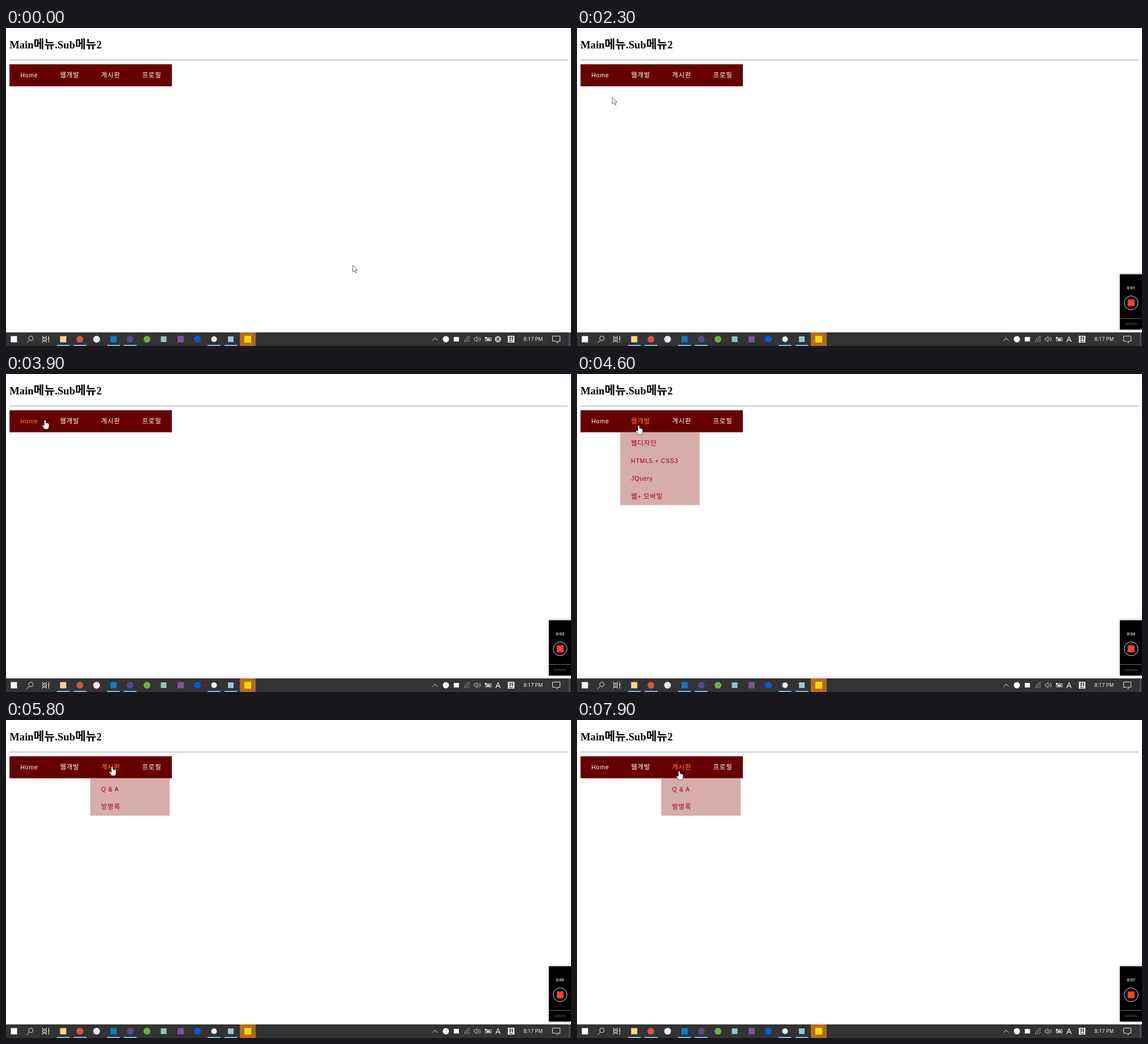
Write an HTML page that moves like this. It is 998 by 561 pixels and loops after 8 s.

```html
<!DOCTYPE html>
<html lang="ko">
<head>
<meta charset="utf-8">
<title>Main메뉴.Sub메뉴2</title>
<style>
html, body { margin: 0; width: 100%; height: 100%; overflow: hidden; background: #fff; }
svg { display: block; }
text { font-family: "Liberation Sans", "Noto Sans CJK KR", "Noto Sans CJK", sans-serif; white-space: pre; }
.title { font: bold 18.7px "Liberation Serif", "Noto Sans CJK KR", "Noto Sans CJK", serif; }
.menu { font-size: 10.5px; letter-spacing: .8px; fill: #fff; }
.sub { fill: #96001c; }
.hot { fill: #ff8c1a; }
.ko { font-size: 1.09em; }
.ui { font-family: "Open Sans", sans-serif; fill: #fff; }
.line { fill: none; stroke: #e4e4e4; }
</style>
</head>
<body>
<svg id="stage" width="998" height="561" viewBox="0 0 998 561"></svg>
<script>
const stage = document.getElementById('stage');
const rect = (x, y, w, h, fill, more = '') =>
  `<rect x="${x}" y="${y}" width="${w}" height="${h}" fill="${fill}" ${more}/>`;
const disc = (x, y, r, fill) => `<circle cx="${x}" cy="${y}" r="${r}" fill="${fill}"/>`;
const line = (d, more = '') => `<path class="line" d="${d}" ${more}/>`;
// Hangul runs are set slightly larger than the Latin around them
const text = (x, y, s, cls, more = '') => `<text x="${x}" y="${y}" class="${cls}" ${more}>` +
  s.replace(/&/g, '&amp;').replace(/[가-힣]+/g, '<tspan class="ko">$&</tspan>') + '</text>';

const menu = [
  { x: 6.2, name: 'Home', items: [] },
  { x: 76.3, name: '웹개발', items: ['웹디자인', 'HTML5 + CSS3', 'JQuery', '웹+ 모바일'] },
  { x: 148.8, name: '게시판', items: ['Q & A', '방명록'] },
  { x: 221.3, name: '프로필', items: [] }
];
const menuLeft = 6.2, menuEnd = 293, menuTop = 64, menuBottom = 102.8;

function drawMenu() {
  return text(6.2, 36, 'Main메뉴.Sub메뉴2', 'title') +
    rect(menuLeft, 56, 985.6, 1, '#9c9c9c') +
    rect(menuLeft, menuTop, menuEnd - menuLeft, menuBottom - menuTop, '#660000') +
    menu.map(({ x, name, items }, i) => {
      const rows = items.map((s, n) => text(x + 19.2, 126 + n * 31.2, s, 'menu sub')).join('');
      return text(x + 19.2, 87, name, 'menu', `id="item${i}"`) +
        `<g id="drop${i}">` +
        (rows && rect(x, menuBottom, 140.4, 3.6 + items.length * 31.2, '#d6adab')) + rows + '</g>';
    }).join('');
}

function drawApps() {
  const square = (x, size, fill) => rect(x - size / 2, 549 - size / 2, size, size, fill);
  return square(14, 11, '#fff') +
    line('M41 551L36.5 555.5') + '<circle class="line" cx="44" cy="547.5" r="4"/>' +
    line('M64.5 543v2.5h7V543M64.5 555v-2.5h7v2.5M64.5 547.5h7v3h-7zM75.5 543v12M74 548h3') +
    square(101, 11, '#f6d77d') + disc(130.5, 549, 6, '#de5145') +
    disc(160, 549, 6, '#f3e6f5') + square(190, 11, '#0a7dcc') +
    disc(219.5, 549, 6, '#55498a') + disc(249, 549, 6, '#68b43e') +
    square(278.5, 10, '#8fc5bd') + square(308.5, 11, '#79569f') +
    disc(338, 549, 6, '#0759e5') + disc(367.5, 549, 5, '#f2f2f2') +
    square(397, 10, '#93c7d4') +
    rect(413, 537, 28, 24, '#b96c1c') + rect(435, 537, 6, 24, '#a9672b') +
    square(427, 12, '#fbd900') +
    [90, 119.5, 178.5, 208, 356, 386].map(x => rect(x, 559, 22.5, 2, '#76b9ed')).join('');
}

function drawTray() {
  return line('M753.5 551.5L758 547L762.5 551.5') +
    disc(777, 549, 5.5, '#fff') + rect(791, 545, 9, 8, '#fff') +
    line('M810 554A11 11 0 0 1 819.5 544M813 554A8 8 0 0 1 819.5 547.5M816 554A5 5 0 0 1 819.5 551', 'stroke-opacity=".7"') +
    line('M827 547h2l3-3v10l-3-3h-2zM834 546.5q2 2.5 0 5M836.5 545q3 4 0 8', 'stroke-opacity=".8"') +
    line('M847 546.5h10v5.5h-10z') + rect(849, 548, 6, 3, '#ddd') + rect(846, 545, 3, 3, '#ddd') +
    '<g id="offline">' + disc(869, 549, 5.5, '#c4c4c4') +
    '<path d="M866.5 546.5l5 5m0-5l-5 5" stroke="#333" stroke-width="1.3"/></g>' +
    text(869, 553.8, 'A', 'ui', 'id="latin" font-size="14.5" text-anchor="middle"') +
    rect(886.5, 543, 11.5, 12, '#fff') +
    text(892.2, 552.6, '한', '', 'font-size="9" font-weight="bold" fill="#222" text-anchor="middle"') +
    text(914, 552.3, '8:17 PM', 'ui', 'font-size="9.2"') +
    line('M965.5 543.5h13v9h-4.5v3l-3-3h-5.5z') + rect(994.5, 537, 1, 24, '#777');
}

function drawRecorder() {
  return '<g id="recorder">' +
    rect(959, 434.5, 39, 97.5, '#000', 'style="filter:drop-shadow(0 0 2px #0006)"') +
    text(978.5, 460.5, '0:00', 'ui', 'id="timer" font-size="7.4" font-weight="600" text-anchor="middle"') +
    '<circle class="line" cx="978.8" cy="484.8" r="12.2"/>' +
    rect(972.7, 478.7, 12.2, 12.2, '#f8402c', 'rx="2"') + rect(959, 512, 39, 1, '#6a6a6a') +
    text(978.5, 523.6, 'CANCEL', 'ui', 'font-size="6" style="fill:#777" text-anchor="middle"') + '</g>';
}

const pointers = '<g id="pointer" fill="#fff" stroke-linejoin="round">' +
  '<path id="arrow" stroke="#444" stroke-width=".8" d="M.5 .5V12.3L3.2 9.8L5.2 14L7.1 13.1L5.2 9.1H8.9Z"/>' +
  '<path id="hand" stroke="#222" stroke-width=".7" d="M-1.5 .8Q0 -1.4 1.4 .8V4.9Q2.8 3.9 3.8 5.3Q5 4.7 5.6 5.9Q7 5.8 7 7.3V10.8Q6.8 13.3 5 15.8H-1.2Q-2.5 12.8 -4.8 10.3Q-5.4 8.5 -3.6 8.3L-1.5 9.9Z"/></g>';

stage.innerHTML = drawMenu() + rect(0, 537, 998, 24, '#333') + drawApps() + drawTray() +
  drawRecorder() + pointers;

const $ = id => document.getElementById(id);
const show = (id, on) => $(id).setAttribute('visibility', on ? 'visible' : 'hidden');

// Pointer tip: time, x, y
const path = [
  [0, 612, 418], [500, 612, 418], [1700, 62, 122], [2500, 62, 122], [3200, 69, 81.5],
  [3900, 69, 81.5], [4500, 109, 91], [4900, 109, 91], [5600, 187.5, 82.5],
  [5900, 187.5, 82.5], [6600, 263.5, 93], [7100, 263.5, 93], [7800, 180.5, 90], [8000, 180.5, 90]
];
const loop = 8000, recordStart = 500;

function tipAt(t) {
  const i = path.findIndex(p => p[0] > t);
  const [t0, x0, y0] = path[i - 1], [t1, x1, y1] = path[i];
  const u = (t - t0) / (t1 - t0), k = u * u * (3 - 2 * u);
  return [x0 + (x1 - x0) * k, y0 + (y1 - y0) * k];
}

function render(now) {
  const t = Math.floor(now % loop / 100) * 100;
  const [x, y] = tipAt(t);
  const inside = y >= menuTop && y < menuBottom && x >= menuLeft && x < menuEnd;
  const hovered = inside ? menu.filter(m => m.x <= x).length - 1 : -1;
  menu.forEach((m, i) => {
    $('item' + i).classList.toggle('hot', i === hovered);
    show('drop' + i, i === hovered);
  });
  $('pointer').setAttribute('transform', `translate(${x} ${y})`);
  show('hand', inside);
  show('arrow', !inside);

  const recording = t >= recordStart;
  show('recorder', recording);
  show('latin', recording);
  show('offline', !recording);
  $('timer').textContent = '0:0' + Math.max(0, Math.floor((t - recordStart) / 1000));
}

const start = performance.now();
function tick() {
  render(performance.now() - start);
  requestAnimationFrame(tick);
}
tick();
</script>
</body>
</html>
```
